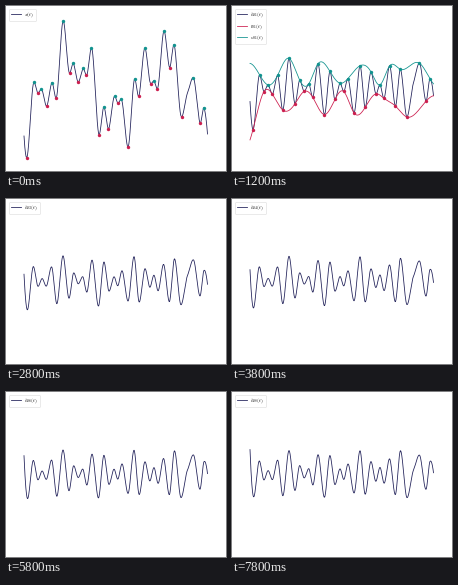
Recreate the animation shown at these times as a matplotlib script. Size 220 px wide and 165 px high, loop 8000 ms.

```python
import numpy as np
import matplotlib.pyplot as plt
from matplotlib.animation import FuncAnimation

W, H, DPI = 220, 165, 72
NAVY, RED, TEAL, AMBER = "#22225a", "#cc1f4f", "#12938f", "#e9a23b"
ROUNDS, STAGES = 8, 5

plt.rcParams["mathtext.fontset"] = "cm"

# time, fast oscillation, slow trend at the turning points
KNOTS = np.array([
    (18, 3, -51), (21.3, -26, -42), (27.3, 14, -10), (32, -5, 0),
    (36, 2, -4), (40.3, -7, -11), (45.6, 12, -7), (50.8, -22, 14),
    (57, 24, 43), (63, -17, 33), (67.7, 7, 17), (72.2, -4, 10),
    (76.7, 4, 15), (80.8, -11, 24), (86, 21, 18), (92.5, -25, -20),
    (98, 17, -36), (103, -9, -31), (108, 3, -12), (111.7, -6, -9),
    (116, 9, -22), (122, -20, -39), (128, 24, -17), (133.2, -21, 14),
    (139, 13, 27), (144, -8, 14), (148, 3, 4), (152, -10, 11),
    (157.5, 15, 41), (163.3, -22, 43), (168.5, 22, 20), (175, -24, -4),
    (181.5, 5, -10), (187.5, 20, -10), (194, -10, -25), (198, 13, -33),
    (201.5, -2, -44),
])


def hermite(tk, yk, slope, t):
    i = np.clip(np.searchsorted(tk, t) - 1, 0, len(tk) - 2)
    h = tk[i + 1] - tk[i]
    s = (t - tk[i]) / h
    rise = s * s * (3 - 2 * s)
    return (yk[i] * (1 - rise) + yk[i + 1] * rise
            + h * s * (1 - s) * ((1 - s) * slope[i] - s * slope[i + 1]))


def spline(tk, yk, t):
    """Cubic spline with not-a-knot ends."""
    n = len(tk)
    h = np.diff(tk)
    d = np.diff(yk) / h
    a = np.zeros((n, n))
    b = np.zeros(n)
    for i in range(1, n - 1):
        a[i, i - 1:i + 2] = h[i - 1], 2 * (h[i - 1] + h[i]), h[i]
        b[i] = 6 * (d[i] - d[i - 1])
    a[0, :3] = h[1], -h[0] - h[1], h[0]
    a[-1, -3:] = h[-1], -h[-2] - h[-1], h[-2]
    m = np.linalg.solve(a, b)
    i = np.clip(np.searchsorted(tk, t) - 1, 0, n - 2)
    p, q, g = tk[i + 1] - t, t - tk[i], h[i]
    return ((m[i] * p**3 + m[i + 1] * q**3) / (6 * g)
            + (yk[i] / g - m[i] * g / 6) * p
            + (yk[i + 1] / g - m[i + 1] * g / 6) * q)


def peaks(y):
    return np.where((y[1:-1] > y[:-2]) & (y[1:-1] >= y[2:]))[0] + 1


def envelope(t, y, idx):
    """Upper envelope, its ends extended along the two nearest peaks."""
    tk, yk = t[idx], y[idx]

    def extend(i, j, end):
        line = yk[i] + (yk[j] - yk[i]) / (tk[j] - tk[i]) * (t[end] - tk[i])
        return max(line, y[end])

    tk2 = np.r_[t[0], tk, t[-1]]
    yk2 = np.r_[extend(0, 1, 0), yk, extend(-1, -2, -1)]
    return spline(tk2, yk2, t)


def sift(t, y):
    rounds = []
    for _ in range(ROUNDS + 1):
        top, low = peaks(y), peaks(-y)
        upper = envelope(t, y, top)
        lower = -envelope(t, -y, low)
        mean = (upper + lower) / 2
        rounds.append((y, top, low, upper, lower, mean))
        y = y - mean
    return rounds


tk, fast, slow = KNOTS.T
slope = np.zeros(len(tk))
slope[0], slope[-5], slope[-1] = -16, 2, -8
t = np.linspace(tk[0], tk[-1], 1100)
rounds = sift(t, hermite(tk, fast, slope, t) + spline(tk, slow, t))

fig = plt.figure(figsize=(W / DPI, H / DPI), dpi=DPI, facecolor="white")
ax = fig.add_axes([0, 0, 1, 1])


def curve(y, color, name, z=2):
    ax.plot(t, y, color=color, lw=0.8, label=f"${name}(t)$", zorder=z)


def dots(y, idx, color):
    ax.plot(t[idx], y[idx], "o", color=color, ms=3.4, mew=0, zorder=4)


def draw(frame):
    k, stage = divmod(frame + 1, STAGES)
    y, top, low, upper, lower, mean = rounds[k]
    sub = f"_{{0{k}}}"
    ax.clear()
    ax.set_xlim(0, W)
    ax.set_ylim(82 - H, 82)
    ax.axis("off")
    curve(y, NAVY, "h" + sub if k else "x")
    if 1 <= stage <= 3:
        dots(y, top, TEAL)
        dots(y, low, RED)
    if 2 <= stage <= 3:
        curve(lower, RED, "l" + sub, 3)
        curve(upper, TEAL, "u" + sub, 3)
    if stage >= 3:
        curve(mean, AMBER, "m" + sub, 3)
    box = ax.legend(loc="upper left", fontsize=5)
    box.get_frame().set_linewidth(0.5)
    return ax.get_children()


anim = FuncAnimation(fig, draw, frames=ROUNDS * STAGES, interval=200,
                     init_func=lambda: [], repeat=True, repeat_delay=0)
plt.show()
```
